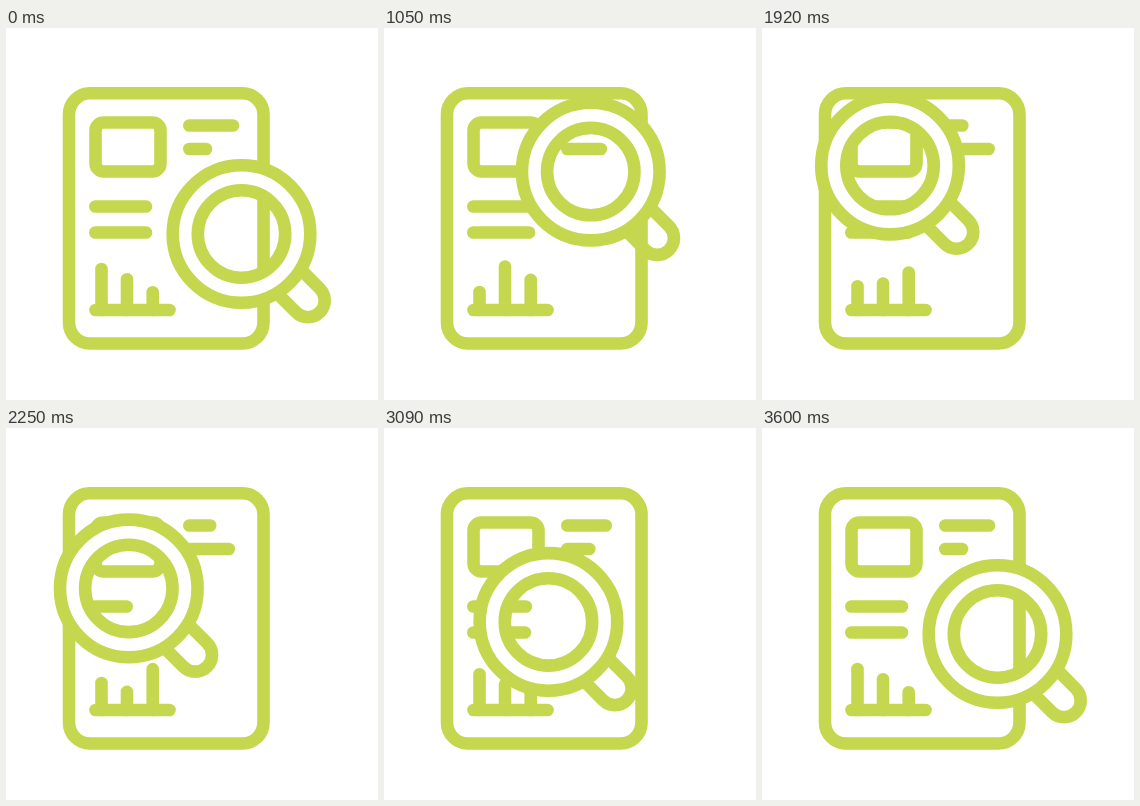
An HTML page for the animation above (3.63 s loop, 372 by 372 pixels).

```html
<!DOCTYPE html>
<html lang="en">
<head>
<meta charset="utf-8">
<title>Report search</title>
<style>
  html, body { margin: 0; width: 100%; height: 100%; overflow: hidden; background: #fff; }
  svg { display: block; width: 100vw; height: 100vh; }
  .ink { fill: none; stroke: #c4d74f; stroke-width: 12.6; stroke-linecap: round; }
  .butt { stroke-linecap: butt; }
  .gap { fill: none; stroke: #fff; stroke-width: 14; }
</style>
</head>
<body>
<svg viewBox="0 0 372 372">
  <g class="ink">
    <rect x="63" y="65.3" width="194.5" height="250.2" rx="21"/>
    <rect x="89.5" y="94.5" width="65" height="49" rx="8"/>
    <path d="M89.5 282H163.5"/>
    <g id="moving"></g>
  </g>
  <g id="lens">
    <path class="ink butt" transform="rotate(45)" d="M66 -16.75H94a16.75 16.75 0 0 1 0 33.5H66"/>
    <circle class="gap" r="56.3"/>
    <circle class="ink" r="68.8"/>
    <circle class="ink" r="43.7"/>
  </g>
</svg>
<script>
  const LOOP = 3630, SPAN = 3600;
  const lens = document.getElementById('lens');
  const moving = document.getElementById('moving');

  // Evenly spaced keys, eased in and out, returning to the first.
  function ease(keys, t) {
    const pos = Math.min(t / SPAN, 1) * keys.length;
    const i = Math.floor(pos), p = pos - i;
    const a = keys[i % keys.length], b = keys[(i + 1) % keys.length];
    return a + (b - a) * p * p * (3 - 2 * p);
  }

  function addPath() {
    const path = document.createElementNS('http://www.w3.org/2000/svg', 'path');
    return moving.appendChild(path);
  }

  const rows = [
    { x: 183.3, y: 97.5, ends: [227, 200] },
    { x: 183.3, y: 121, ends: [200, 227] },
    { x: 89.3, y: 178.5, ends: [140, 140, 146, 146, 116, 142] },
    { x: 89.3, y: 204.5, ends: [140, 140, 146, 146, 146, 141] }
  ];
  const bars = [
    { x: 95.5, tops: [241, 265, 254.5] },
    { x: 121, tops: [251.3, 238, 265] },
    { x: 146.7, tops: [264.3, 251.3, 240.7] }
  ];
  for (const item of [...rows, ...bars]) item.path = addPath();

  const lensX = [235.5, 213, 128.6, 117];
  const lensY = [206, 144.3, 135.1, 185.8];

  function draw(now) {
    const t = now % LOOP;
    for (const r of rows) r.path.setAttribute('d', `M${r.x} ${r.y}H${ease(r.ends, t)}`);
    for (const b of bars) b.path.setAttribute('d', `M${b.x} 282V${ease(b.tops, t)}`);
    lens.setAttribute('transform', `translate(${ease(lensX, t)} ${ease(lensY, t)})`);
  }

  let start;
  function tick(now) {
    start ??= now;
    draw(now - start);
    requestAnimationFrame(tick);
  }
  draw(0);
  requestAnimationFrame(tick);
</script>
</body>
</html>
```
